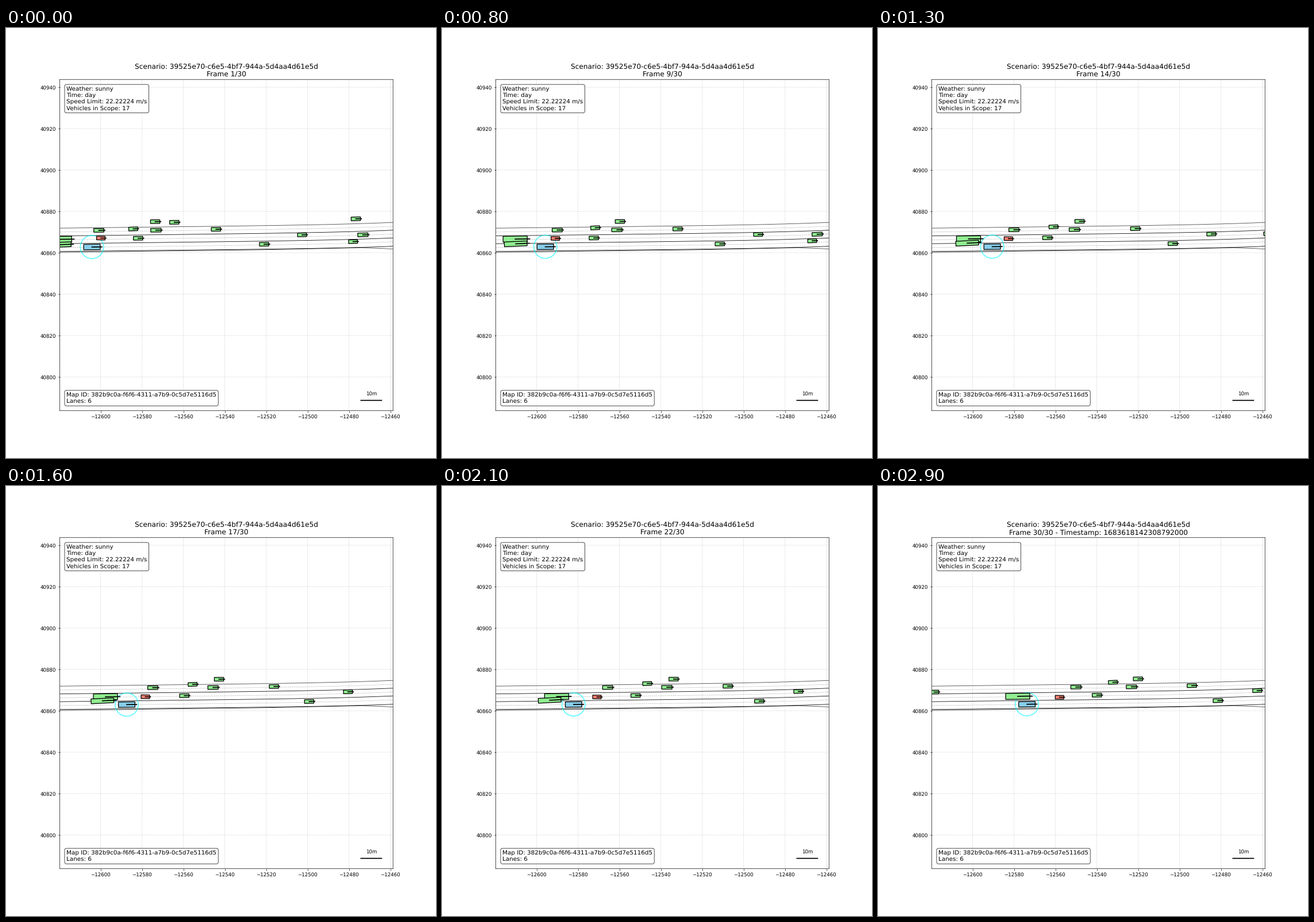
A matplotlib script for the animation above (3000 ms loop, 748 px wide and 748 px high).

```python
import math

import matplotlib.pyplot as plt
import numpy as np
from matplotlib.animation import FuncAnimation
from matplotlib.patches import Circle, Polygon

SIZE = 748
FRAMES = 30
SCALE = 3.6                    # pixels per metre
LEFT, TOP = 0.125 * SIZE, 0.12 * SIZE
WIDTH = 0.775 * SIZE
X_MIN, X_MAX = -12619.78, -12458.75
Y_MIN, Y_MAX = 40783.68, 40943.68
ROAD_TOP, LANE = 348.2, 13.5   # first border and lane width in pixels

# soft, unsnapped rendering of lines and glyphs
plt.rcParams.update({"font.family": "DejaVu Sans", "text.hinting": "none",
                     "path.snap": False})
fig, ax = plt.subplots(figsize=(12, 12), dpi=SIZE / 12)


def to_map(x, y):
    """Stage pixels to map metres."""
    return (X_MIN + (np.asarray(x) - LEFT) / SCALE,
            Y_MAX - (np.asarray(y) - TOP) / SCALE)


def road_y(x, lane):
    """Height of a lane position; the road climbs, steeper at its far end."""
    t = np.clip((x - LEFT) / WIDTH, 0, 1.1)
    rise = 7 * t + 3 * t ** 6
    return ROAD_TOP + LANE * lane - rise * (0.9 if lane == 3 else 1)


# --- road -----------------------------------------------------------------
road_x = np.linspace(LEFT, LEFT + WIDTH, 60)
for lane in range(4):
    ax.plot(*to_map(road_x, road_y(road_x, lane)), color="black", lw=1,
            alpha=0.92 if lane else 0.7)
    if lane < 3:
        ax.plot(*to_map(road_x, road_y(road_x, lane + 0.5)), color="gray",
                ls="--", lw=0.8, alpha=0.6)
ax.plot(*to_map([93.5, 450, 620, 673.2], [390.3, 385.8, 382.2, 384.4]),
        color="black", lw=1, alpha=0.7)


# --- vehicles -------------------------------------------------------------
def traffic_time(k):
    """Traffic updates fall one step behind for a while, then catch up."""
    return k - np.interp(k, [3, 6, 8, 13], [0, 1, 1, 0])


class Vehicle:
    """A box with a heading line, moving along a lane position."""

    def __init__(self, x, lane, speed, accel=0, drift=0, length=16.2, width=6.4,
                 color="lightgreen", clock=traffic_time, last=FRAMES):
        self.x, self.lane = x, lane
        self.speed, self.accel, self.drift = speed, accel, drift
        self.length, self.width = length, width
        self.clock, self.last = clock, last
        z = 5 + 0.01 * len(ax.patches)
        self.box = ax.add_patch(Polygon(np.zeros((4, 2)), closed=True, fc=color,
                                        ec="black", lw=1.5, zorder=z))
        self.nose, = ax.plot([], [], color="black", lw=2, zorder=z)

    def position(self, t):
        x = self.x + self.speed * t + self.accel * t * t / 2
        return x, road_y(x, self.lane + self.drift * t)

    def update(self, k):
        shown = k < self.last
        self.box.set_visible(shown)
        self.nose.set_visible(shown)
        t = self.clock(k)
        x, y = self.position(t)
        ahead_x, ahead_y = self.position(t + 1)
        tilt = math.atan2(y - ahead_y, ahead_x - x)
        c, s = math.cos(tilt), math.sin(tilt)
        along = self.length / 2 * np.array([-1, 1, 1, -1])
        across = self.width / 2 * np.array([-1, -1, 1, 1])
        corners = to_map(x + along * c + across * s, y - along * s + across * c)
        self.box.set_xy(np.column_stack(corners))
        reach = 0.6 * self.length
        self.nose.set_data(*to_map([x, x + reach * c], [y, y - reach * s]))


ego = Vehicle(149.5, 2.48, 3.78, length=28.8, width=9.4, color="skyblue",
              clock=float)
fleet = [
    ego,
    Vehicle(165, 1.34, 4.4, 0.055, drift=0.01, length=14.8, color="salmon"),
    # trucks
    Vehicle(93.3, 1.44, 4.76, 0.028, length=42, width=10.5),
    Vehicle(93.5, 2.13, 5.2, -0.07, drift=-0.011, length=39.5, width=8.3, last=22),
    # outermost lane
    Vehicle(259.5, -0.69, 7.3, -0.045, drift=0.003),
    Vehicle(292.8, -0.58, 6.3, last=6),
    Vehicle(608.5, -0.63, 6.55, last=6),
    # upper lane
    Vehicle(161.5, 0.34, 5.33, 0.067, length=17.6),
    Vehicle(221.3, 0.21, 6.46, drift=-0.0145, length=15.6),
    Vehicle(260.8, 0.41, 6.21, length=18),
    Vehicle(365.3, 0.39, 6.4, -0.012),
    Vehicle(-76.4, 0.77, 6),
    # middle lane
    Vehicle(229.8, 1.42, 4.8, 0.028),
    Vehicle(515, 1.27, 4.99, length=15.6),
    Vehicle(620.8, 1.46, 4.55, length=17.8),
    # lower lane
    Vehicle(449, 2.4, 4.9),
    Vehicle(603.7, 2.29, 5.75, length=15.4, last=12),
]

halo = ax.add_patch(Circle((0, 0), 5.6, fill=False, ec="cyan", lw=2,
                           alpha=0.6, zorder=4))

# --- labels ---------------------------------------------------------------
panel = dict(boxstyle="round", facecolor="white", alpha=0.8)


def note(y, va, *lines):
    ax.text(0.02, y, "\n".join(lines), transform=ax.transAxes, fontsize=12,
            va=va, bbox=panel, zorder=8)


note(0.98, "top", "Weather: sunny", "Time: day",
     "Speed Limit: 22.22224 m/s", "Vehicles in Scope: 17")
note(0.02, "bottom", "Map ID: 382b9c0a-f6f6-4311-a7b9-0c5d7e5116d5", "Lanes: 6")

bar_x, bar_y = -12474.26, Y_MIN + 5
ax.plot([bar_x, bar_x + 10], [bar_y, bar_y], color="black", lw=2)
ax.text(bar_x + 5, bar_y + 2, "10m", ha="center", va="bottom", fontsize=10)

ax.grid(True, ls="--", alpha=0.5)
ax.set_xticks(range(-12600, -12459, 20))
ax.set_yticks(range(40800, 40941, 20))
ax.set_xlim(X_MIN, X_MAX)
ax.set_ylim(Y_MIN, Y_MAX)
title = ax.set_title("", fontsize=14)


def draw(k):
    for vehicle in fleet:
        vehicle.update(k)
    halo.center = to_map(*ego.position(k))
    text = f"Scenario: 39525e70-c6e5-4bf7-944a-5d4aa4d61e5d\nFrame {k + 1}/{FRAMES}"
    if k == FRAMES - 1:
        text += " - Timestamp: 1683618142308792000"
    title.set_text(text)
    return []


anim = FuncAnimation(fig, draw, frames=FRAMES, interval=100,
                     init_func=lambda: draw(0), repeat=True, repeat_delay=0)
plt.show()
```
